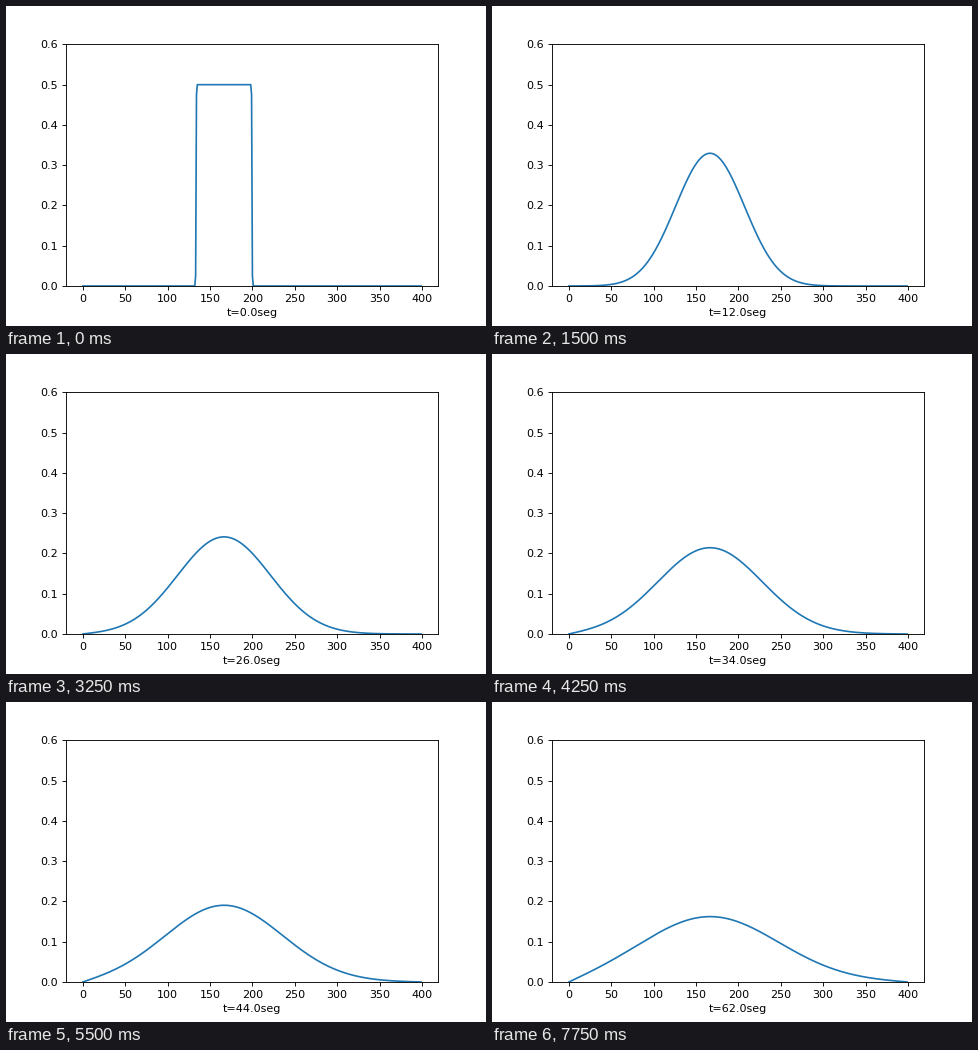
Animation, 480 px wide and 320 px high, one loop 8 s. Source, as a matplotlib script:

```python
import numpy as np
import matplotlib.pyplot as plt
from matplotlib.animation import FuncAnimation

FRAMES = 32
INTERVAL = 250          # ms
SECONDS_PER_FRAME = 2.0
DT = 0.001              # solver time step, s
R = 0.05                # diffusion number per step
N = 400


def diffuse(u, steps):
    """Explicit heat equation with both ends held at zero."""
    u = u.copy()
    for _ in range(steps):
        u[1:-1] += R * (u[2:] - 2 * u[1:-1] + u[:-2])
    return u


def solve():
    start = np.zeros(N)
    start[134:200] = 0.5
    states = [diffuse(start, 1)]
    steps = round(SECONDS_PER_FRAME / DT)
    for _ in range(FRAMES - 1):
        states.append(diffuse(states[-1], steps))
    return states


states = solve()

fig, ax = plt.subplots(figsize=(6, 4), dpi=80)
fig.subplots_adjust(left=0.125, right=0.9, bottom=0.125, top=0.88)
line, = ax.plot(np.arange(N), states[0], color="#1f77b4", lw=1.5)
ax.set_ylim(0, 0.6)
label = ax.set_xlabel("t=0.0seg")


def update(i):
    line.set_ydata(states[i])
    label.set_text(f"t={i * SECONDS_PER_FRAME:.1f}seg")
    return line, label


anim = FuncAnimation(fig, update, frames=FRAMES, interval=INTERVAL,
                     repeat=True, repeat_delay=0, blit=False)
plt.show()
```
